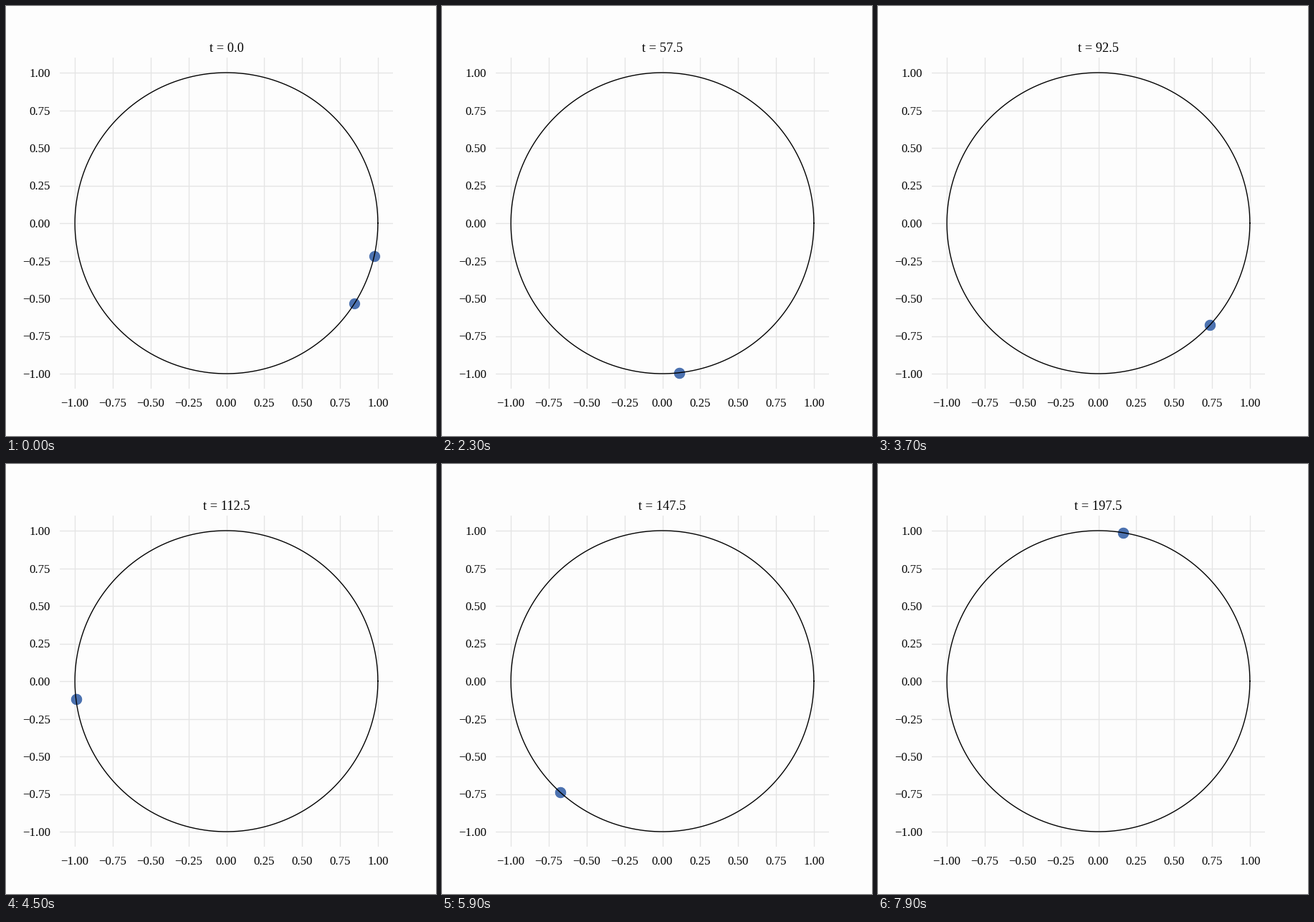
These frames come from a looping animation (600 px wide and 600 px high, 8 s). A matplotlib script:

```python
import numpy as np
import matplotlib.pyplot as plt
from matplotlib.animation import FuncAnimation

FRAMES = 80
STEP = 2.5          # model time per frame
OMEGA = 0.2         # shared natural frequency
COUPLING = 0.3
MEAN = -0.3919      # mean phase at t = 0
HALF_GAP = 0.171    # half of the phase difference at t = 0

plt.rcParams.update({
    "font.family": "Liberation Serif",
    "text.color": "black",
    "figure.facecolor": "#fdfdfd",
    "axes.facecolor": "#fdfdfd",
})


def phases(t):
    """Exact solution of two identical coupled phase oscillators."""
    half = np.arctan(np.tan(HALF_GAP) * np.exp(-COUPLING * t))
    return MEAN + OMEGA * t + half * np.array([-1, 1])


fig, ax = plt.subplots(figsize=(6, 6), dpi=100)
ax.set(xlim=(-1.1, 1.1), ylim=(-1.1, 1.1))
ticks = np.linspace(-1, 1, 9)
ax.set_xticks(ticks)
ax.set_yticks(ticks)
ax.tick_params(length=0, pad=9.5, labelsize=12.1)
ax.grid(color="#e5e5e5", linewidth=1)
ax.set_axisbelow(True)
for spine in ax.spines.values():
    spine.set_visible(False)

angle = np.linspace(0, 2 * np.pi, 400)
ax.plot(np.cos(angle), np.sin(angle), color="black", lw=1, zorder=3)
dots, = ax.plot([], [], "o", color="#4c72b0", markersize=10, zorder=2)
title = ax.set_title("", fontsize=13.2, pad=6)


def update(frame):
    t = frame * STEP
    theta = phases(t)
    dots.set_data(np.cos(theta), np.sin(theta))
    title.set_text(f"t = {t:.1f}")
    return dots, title


anim = FuncAnimation(fig, update, frames=FRAMES, interval=100,
                     repeat=True, repeat_delay=0, blit=False)
plt.show()
```
